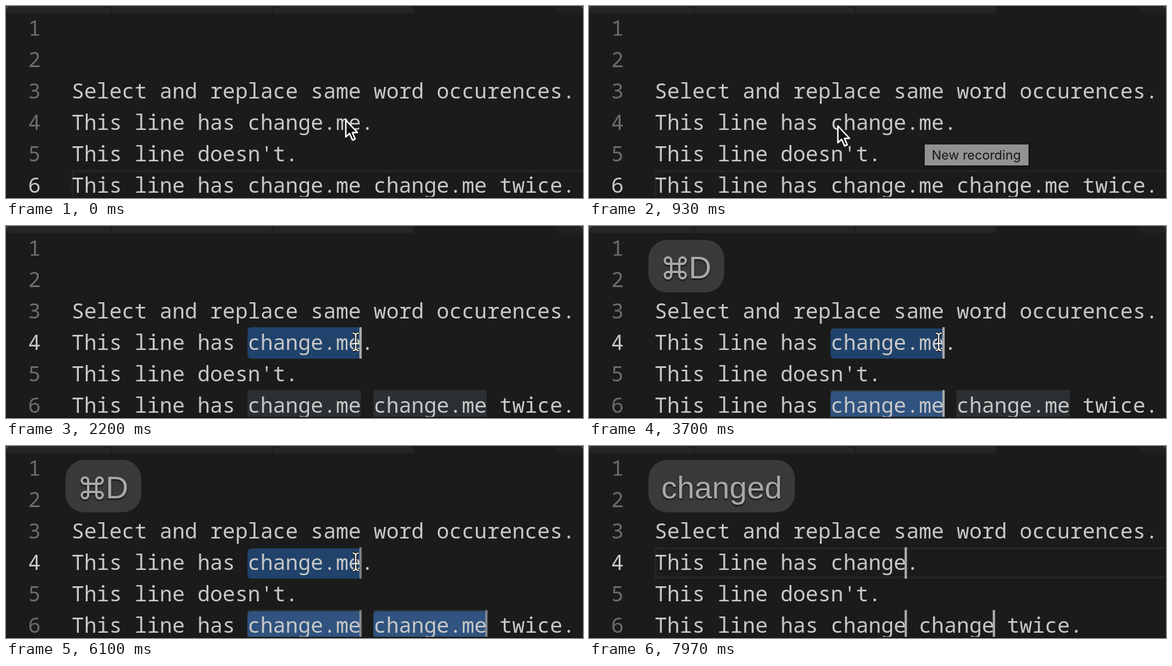
An HTML page with a canvas for the animation above (8000 ms loop, 990 by 330 pixels).

```html
<!DOCTYPE html>
<html lang="en">
<head>
<meta charset="utf-8">
<title>Replacing every occurrence of a word</title>
<style>
html, body { margin: 0; width: 100%; height: 100%; overflow: hidden; background: #1b1b1b; }
canvas { display: block; }
</style>
</head>
<body>
<canvas id="stage" width="990" height="330"></canvas>
<script>
const ctx = document.getElementById('stage').getContext('2d');
const LOOP = 8000, LEFT = 113, CHAR = 21.6, ROW = 54;
const BG = '#1b1b1b', DIM = '#6c6c6c', BRIGHT = '#c8c8c8';
const CODE = '36px "Noto Sans Mono", monospace';
const KEYS = '54px "Liberation Sans", Arial, sans-serif';

// Moments of the story, in ms
const CLICK = 1180, DRAG = 1570, DRAG_END = 2060, MATCH = 2160;
const ADD_1 = 3270, ADD_2 = 4680, ERASE = 6320;
const TYPED = [7000, 7200, 7310, 7430, 7550, 7690, 7970];
const LAG = 70; // the editor reacts a little after the key overlay

const clamp = v => Math.min(1, Math.max(0, v));
const ramp = (t, a, b) => clamp((t - a) / (b - a));
const ease = p => p * p * (3 - 2 * p);
const colX = col => LEFT + col * CHAR;
const rowY = row => 12 + (row - 1) * ROW;

function box(x, y, w, h, color, r = 0) {
  ctx.fillStyle = color;
  ctx.beginPath();
  ctx.roundRect(x, y, w, h, r);
  ctx.fill();
}

function label(text, x, y, font, color) {
  ctx.font = font;
  ctx.fillStyle = color;
  ctx.fillText(text, x, y);
}

function drawTabs() {
  box(0, 0, 990, 12, '#252525');
  for (const x of [180, 456]) box(x, 0, 2, 12, BG);
  box(699, 0, 245, 12, BG);
  box(944, 0, 46, 12, '#212121');
  ctx.strokeStyle = '#4a4a4a';
  ctx.lineWidth = 1.5;
  ctx.beginPath();
  ctx.moveTo(0, 4);
  ctx.quadraticCurveTo(1, 1, 5, 0);
  ctx.moveTo(985, 0);
  ctx.quadraticCurveTo(989, 1, 990, 4);
  ctx.stroke();
}

function drawLineFrame(row) {
  ctx.strokeStyle = '#242424';
  ctx.lineWidth = 4;
  ctx.strokeRect(LEFT + 1, rowY(row) + 2, 900, ROW - 4);
}

function drawMark(row, from, to, color, inset = 0, r = 0) {
  box(colX(from) - 1, rowY(row) + inset, (to - from) * CHAR, ROW - inset, color, r);
}

function caretAlpha(t) {
  const starts = [[5300, ERASE], [3870, ADD_2], [2700, ADD_1]];
  const run = starts.find(([a, b]) => t >= a && t < b);
  if (!run) return 1;
  const p = (t - run[0]) % 750;
  return 1 - ease(ramp(p, 0, 130)) + ease(ramp(p, 310, 430));
}

function drawEditor(t) {
  const erased = t >= ERASE + LAG;
  const word = erased ? 'changed'.slice(0, TYPED.filter(k => t >= k + LAG).length) : 'change.me';
  const clicked = t >= CLICK;
  const end = erased ? 14 + word.length
    : Math.min(23, Math.max(14, Math.round((pointerAt(t)[0] - LEFT) / CHAR)));
  const second = 15 + 2 * word.length;
  const selecting = clicked && !erased && end > 14;
  const two = t >= ADD_1 + LAG, three = t >= ADD_2 + LAG;

  if (!selecting) drawLineFrame(clicked ? 4 : 6);
  if (selecting) {
    if (t >= MATCH) for (const c of [14, 24]) drawMark(6, c, c + 9, '#2c3033');
    drawMark(4, 14, end, '#20426b', two ? 2 : 0, 6);
    if (two) drawMark(6, 14, 23, '#30537f', 2, 6);
    if (three) drawMark(6, 24, 33, '#30537f', 2, 6);
  }

  const lines = ['', '', 'Select and replace same word occurences.',
    `This line has ${word}.`, "This line doesn't.", `This line has ${word} ${word} twice.`];
  lines.forEach((line, i) => {
    const y = rowY(i + 1) + 38.5;
    label(i + 1, 38, y, CODE, i + 1 === (clicked ? 4 : 6) ? BRIGHT : DIM);
    label(line, LEFT - 0.6, y, CODE, BRIGHT);
  });

  if (clicked) {
    const carets = [[4, end]];
    if (two) carets.push([6, end]);
    if (three) carets.push([6, second]);
    ctx.globalAlpha = caretAlpha(t);
    for (const [row, col] of carets) box(colX(col) - 3.5, rowY(row), 4, ROW, '#acacac');
    ctx.globalAlpha = 1;
  }
  box(0, 328, 990, 2, '#151314');
}

function commandIcon(x, y) {
  ctx.save();
  ctx.translate(x + 24, y);
  ctx.beginPath();
  for (let i = 0; i < 4; i++) {
    ctx.moveTo(7, -12.5);
    ctx.lineTo(7, 12.5);
    ctx.arc(12.5, 12.5, 5.5, Math.PI, -Math.PI / 2, true);
    ctx.rotate(Math.PI / 2);
  }
  ctx.stroke();
  ctx.restore();
}

function eraseIcon(x, y) {
  ctx.save();
  ctx.translate(x, y);
  ctx.stroke(new Path2D('M3 0L17-15H43Q46-15 46-12V12Q46 15 43 15H17ZM22-7L36 7M36-7L22 7'));
  ctx.restore();
}

function drawKeys(keys, y, alpha = 1) {
  const icon = { '⌘': [commandIcon, 47], '⌫': [eraseIcon, 50] }[keys[0]];
  const text = icon ? keys.slice(1) : keys;
  const indent = icon ? icon[1] : 0;
  ctx.save();
  ctx.globalAlpha = alpha;
  ctx.font = KEYS;
  box(102, y, 44 + indent + ctx.measureText(text).width, 90, '#3a3a3a', 32);
  ctx.shadowColor = '#000b';
  ctx.shadowBlur = 3;
  ctx.shadowOffsetY = 2;
  ctx.strokeStyle = '#a8a8a8';
  ctx.lineWidth = 4;
  if (icon) icon[0](124, y + 48);
  label(text, 124 + indent, y + 66, KEYS, '#a8a8a8');
  ctx.restore();
}

function drawOverlay(t) {
  const count = TYPED.filter(k => t >= k).length;
  if (count) {
    const fade = 1 - ramp(t, 7250, 7550);
    if (fade > 0) drawKeys('⌫', -86, fade);
    drawKeys('changed'.slice(0, count), 24);
  } else if (t >= ERASE) drawKeys('⌫', 24);
  else if (t >= ADD_1) drawKeys('⌘D', 24);
}

function drawTooltip(t) {
  ctx.save();
  ctx.globalAlpha = ramp(t, 30, 200) * (1 - ramp(t, 1080, 1230));
  ctx.shadowColor = '#0006';
  ctx.shadowBlur = 8;
  ctx.shadowOffsetY = 2;
  box(576, 238, 178, 36, '#929292');
  ctx.shadowColor = 'transparent';
  label('New recording', 588, 264, '22px Inter, sans-serif', '#151515');
  ctx.restore();
}

function pointerAt(t) {
  const path = [[0, 583, 196], [30, 583, 196], [230, 552, 198], [430, 552, 198], [930, 427, 206],
    [1130, 416, 201], [DRAG, 416, 201], [DRAG_END, 600, 199], [LOOP, 600, 199]];
  const i = path.findIndex(p => p[0] > t);
  const [a, b] = [path[i - 1], path[i]];
  const p = ease(ramp(t, a[0], b[0]));
  return [a[1] + (b[1] - a[1]) * p, a[2] + (b[2] - a[2]) * p];
}

const ARROW = new Path2D('M0 0V29L6.5 23L11.5 34.5L16 32.5L11.5 21.5H20Z');
const BEAM = new Path2D('M-5-15Q0-15 0-10V10Q0 15-5 15M5-15Q0-15 0-10M0 10Q0 15 5 15M-3 3H3');

function drawPointer(t) {
  ctx.save();
  ctx.translate(...pointerAt(t));
  ctx.lineJoin = 'round';
  if (t < CLICK) {
    ctx.fillStyle = '#111';
    ctx.strokeStyle = '#fff';
    ctx.lineWidth = 2.5;
    ctx.fill(ARROW);
    ctx.stroke(ARROW);
  } else {
    for (const [color, width] of [['#1a1a1a', 5], ['#f2f2f2', 2.2]]) {
      ctx.strokeStyle = color;
      ctx.lineWidth = width;
      ctx.stroke(BEAM);
    }
  }
  ctx.restore();
}

function draw(now) {
  const t = Math.max(0, now - start) % LOOP;
  box(0, 0, 990, 330, BG);
  drawTabs();
  drawEditor(t);
  drawTooltip(t);
  drawOverlay(t);
  // The pointer hides while typing
  if (t < ERASE + LAG) drawPointer(t);
  requestAnimationFrame(draw);
}

const start = performance.now();
draw(start);
</script>
</body>
</html>
```
